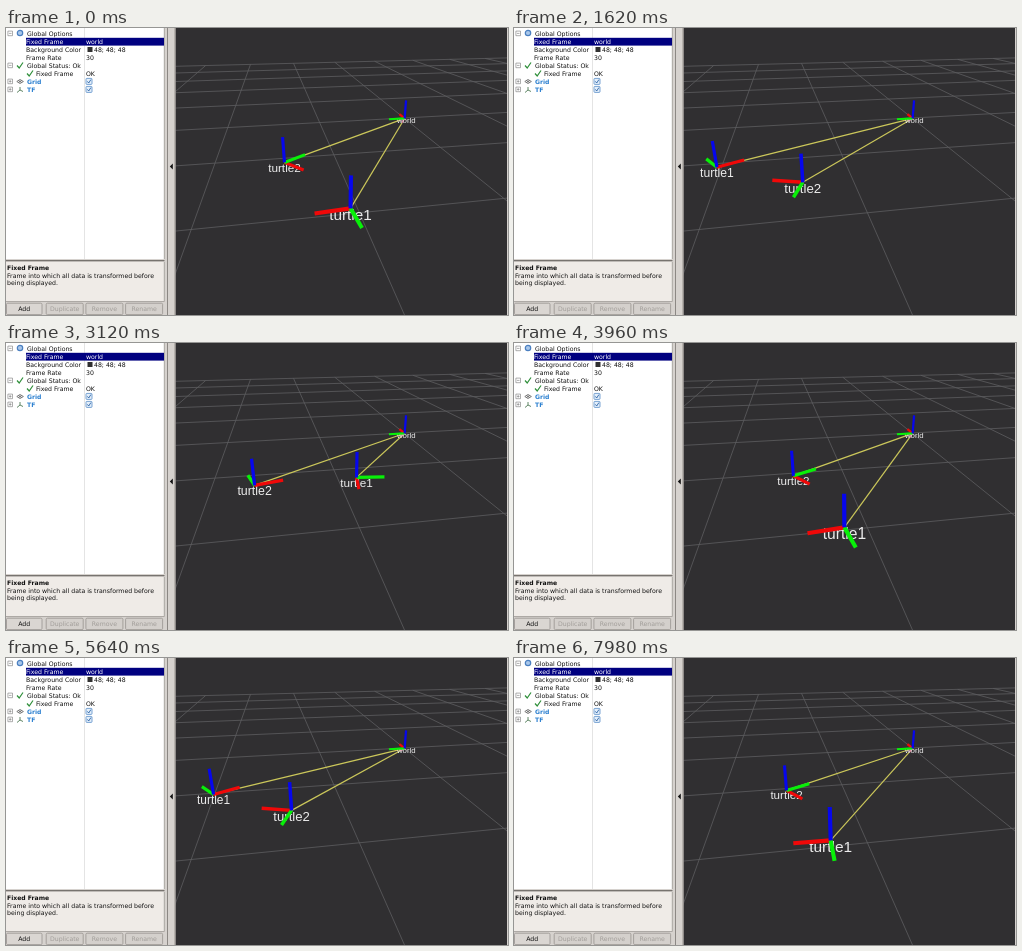
Animation, 502 px wide and 287 px high, one loop 8000 ms. Source, as an HTML page:

```html
<!DOCTYPE html>
<html lang="en">
<head>
<meta charset="utf-8">
<title>Two turtle frames</title>
<style>
  html, body { margin: 0; width: 100%; height: 100%; overflow: hidden; background: #302f31; }
  svg { display: block; width: 502px; height: 287px; }
  #panel text { font: 6.2px "DejaVu Sans", sans-serif; }
  #panel text.b { font-weight: bold; font-size: 6.1px; }
  #view text { font-family: "Liberation Sans", sans-serif; fill: #ececec; text-anchor: middle; }
</style>
</head>
<body>
<svg viewBox="0 0 502 287" xmlns="http://www.w3.org/2000/svg">
  <defs><clipPath id="clip"><rect x="169.5" width="333" height="287"/></clipPath></defs>
  <g id="view" clip-path="url(#clip)">
    <rect x="169" width="333" height="287" fill="#302f31"/>
    <g id="grid" stroke="#5e5d60" stroke-width=".8"></g>
    <g id="scene" transform="translate(.6 .4)"></g>
    <rect x="501" width="1" height="287" fill="#d6d2ce"/>
  </g>
  <g id="panel">
    <rect width="169.5" height="287" fill="#d6d2ce"/>
    <rect width="158" height="231" fill="#fff"/>
    <path d="M78.5 0V231" stroke="#dedede" stroke-width=".8"/>
    <rect y="234" width="158" height="39.5" fill="#efebe7"/>
    <path d="M158.3 0V231M158.3 234V273.5H0" fill="none" stroke="#a09c98" stroke-width=".8"/>
    <path d="M0 232.6H158.5" stroke="#77736f" stroke-width="1.4"/>
    <path d="M161.5 0V287" stroke="#8c8884"/>
    <path d="M168.8 0V287" stroke="#aaa6a2"/>
    <path d="M166.8 135.6V141.4L163.8 138.5Z" fill="#111"/>
    <rect x="20" y="9.8" width="138" height="7.8" fill="#000080"/>
    <circle cx="14" cy="5" r="2.7" fill="#a9c7ea" stroke="#4a7fc0" stroke-width="1.2"/>
    <g fill="none" stroke="#2f8f3a" stroke-width="1.2">
      <path d="M11 37.5L13.2 40L17 34.5"/>
      <path d="M21 45.5L23.2 48L27 42.5"/>
    </g>
    <path d="M10.8 53.5L14 51.5L17.4 53.5L14 55.5ZM12.4 52.5L15.7 54.5M15.7 52.5L12.4 54.5" fill="none" stroke="#6c6c6c" stroke-width=".9"/>
    <path d="M14 59V62L11 64.5M14 62L17 63.5" fill="none" stroke="#4f7a55" stroke-width=".9"/>
    <rect x="81.5" y="19" width="5" height="5" fill="#303030"/>
  </g>
</svg>
<script>
const NS = 'http://www.w3.org/2000/svg';
const $ = id => document.getElementById(id);
function add(parent, tag, attrs, text) {
  const el = document.createElementNS(NS, tag);
  set(el, attrs);
  if (text) el.textContent = text;
  parent.appendChild(el);
  return el;
}
function set(el, attrs) {
  for (const k in attrs) el.setAttribute(k, attrs[k]);
}

// Side panel
const panel = $('panel');
const label = (x, y, s, fill = '#111', cls = '') => add(panel, 'text', { x, y, fill, class: cls }, s);
const rows = [
  [21, 'Global Options'],
  [20, 'Fixed Frame', 'world', '#fff'],
  [20, 'Background Color', '48; 48; 48'],
  [20, 'Frame Rate', '30'],
  [21, 'Global Status: Ok'],
  [30, 'Fixed Frame', 'OK'],
  [21, 'Grid', '', '#2a7fd0', 'b'],
  [21, 'TF', '', '#2a7fd0', 'b'],
];
rows.forEach(([x, name, value, fill, cls], i) => {
  const y = 5.4 + 8 * i;
  label(x, y + 2.3, name, fill, cls);
  if (value) label(i === 2 ? 88 : 80, y + 2.3, value, fill);
  if (x === 21) {
    const plus = cls ? `M4.2 ${y - 1.3}v2.6` : '';
    add(panel, 'path', {
      d: `M1.9 ${y - 2.3}h4.6v4.6h-4.6zM2.9 ${y}h2.6${plus}`,
      fill: '#fff', stroke: '#777', 'stroke-width': .6,
    });
  }
  if (cls) {
    add(panel, 'rect', { x: 80, y: y - 3, width: 6, height: 6, rx: .8, fill: '#e4effa', stroke: '#5a8fc8', 'stroke-width': .8 });
    add(panel, 'path', { d: `M81.4 ${y}l1.3 1.6l2.2 -3.4`, fill: 'none', stroke: '#2a62a8', 'stroke-width': .9 });
  }
});
label(1, 242, 'Fixed Frame', '#111', 'b');
label(1, 249.5, 'Frame into which all data is transformed before');
label(1, 257, 'being displayed.');
['Add', 'Duplicate', 'Remove', 'Rename'].forEach((s, i) => {
  const x = .5 + 39.7 * i, width = i ? 37 : 35.5;
  add(panel, 'rect', { x, y: 275.2, width, height: 11.4, rx: 1.2, fill: i ? '#d4d0cc' : '#dad6d2', stroke: '#989490', 'stroke-width': .8 });
  label(x + width / 2, 283.4, s, i ? '#a19d99' : '#111').setAttribute('text-anchor', 'middle');
});

// Ground plane in grid cells: a runs right, b runs away; the world frame is 0,0
const HORIZON = -18;
function project(a, b) {
  const u = 1.241 + .8 * a, v = 18.47 + 4.206 * b, s = 2129 / (u + v);
  return { x: 264 + u * s, y: HORIZON + s, s };
}
const ends = (p, q) => ({ x1: p.x, y1: p.y, x2: q.x, y2: q.y });
for (let n = -5; n <= 5; n++) {
  add($('grid'), 'line', ends(project(n, -3.2), project(n, 5)));
  if (n > -4) add($('grid'), 'line', ends(project(-5, n), project(5, n)));
}

// Smooth curve through keys at uneven times
const TIMES = [0, 1620, 3120, 4680, 5640, 6540, 7980];
function curve(keys, t) {
  const last = TIMES.length - 1;
  let i = 0;
  while (i < last - 1 && t >= TIMES[i + 1]) i++;
  const slope = k => {
    const l = Math.max(k - 1, 0), r = Math.min(k + 1, last);
    return (keys[r] - keys[l]) / (TIMES[r] - TIMES[l]);
  };
  const h = TIMES[i + 1] - TIMES[i], f = (t - TIMES[i]) / h, g = 1 - f;
  return g * g * (1 + 2 * f) * keys[i] + f * f * (3 - 2 * f) * keys[i + 1]
    + h * f * g * (g * slope(i) - f * slope(i + 1));
}

// Both turtles circle clockwise round one centre line; angles in degrees
const turtles = [
  {
    name: 'turtle1', b: -1.42,
    angle: [-51, -211, -340, -489, -576, -639, -785],
    radius: [.657, .68, .655, .617, .685, .643, .554],
    heading: [185, 30, -98, -239, -328, -391, -542],
  },
  {
    name: 'turtle2', b: -1.27,
    angle: [83, -68, -197, -348, -430, -503, -624],
    radius: [.188, .226, .226, .215, .184, .214, .241],
    heading: [-52, -199, -344, -481, -560, -632, -779],
  },
];

const scene = $('scene');
const layers = [0, 1, 2].map(() => add(scene, 'g', {}));
function makeFrame(name, scale) {
  const axis = stroke => add(layers[2], 'line', { stroke });
  return {
    scale,
    text: add(layers[1], 'text', {}, name),
    x: axis('#f00808'), y: axis('#08f008'), z: axis('#0606ee'),
  };
}
function placeFrame(f, a, b, deg) {
  const p = project(a, b), rad = deg * Math.PI / 180, len = .235 * f.scale;
  const c = len * Math.cos(rad), d = len * Math.sin(rad), up = p.s / 6;
  const top = { x: p.x + (p.x - 335) * up / (887 - p.y), y: p.y - up };
  const w = { 'stroke-width': .0205 * p.s };
  set(f.x, { ...ends(p, project(a + c, b + d)), ...w });
  set(f.y, { ...ends(p, project(a - d, b + c)), ...w });
  set(f.z, { ...ends(p, top), ...w });
  set(f.text, { x: p.x, y: p.y + .06 * p.s, 'font-size': .0775 * p.s });
  return p;
}

const world = makeFrame('world', .82);
const home = placeFrame(world, 0, 0, 90);
set(world.text, { x: home.x + 1.6, y: 95, 'font-size': 7.8 });
for (const t of turtles) {
  t.link = add(layers[0], 'line', { stroke: '#cbc75a', 'stroke-width': 1.2 });
  t.head = add(layers[0], 'line', { stroke: '#e07a92', 'stroke-width': 1.5 });
  t.frame = makeFrame(t.name, 1);
}

function draw(ms) {
  for (const t of turtles) {
    const rad = curve(t.angle, ms) * Math.PI / 180, r = curve(t.radius, ms);
    const p = placeFrame(t.frame, -1.46 + r * Math.cos(rad), t.b + r * Math.sin(rad), curve(t.heading, ms));
    const k = 5 / Math.hypot(p.x - home.x, p.y - home.y);
    const neck = { x: home.x + (p.x - home.x) * k, y: home.y + (p.y - home.y) * k };
    set(t.link, ends(p, neck));
    set(t.head, ends(neck, home));
  }
}

const LOOP = 8000, STEP = 60;
const start = performance.now();
function tick() {
  const t = (performance.now() - start) % LOOP;
  draw(Math.floor(t / STEP) * STEP);
  requestAnimationFrame(tick);
}
tick();
</script>
</body>
</html>
```
